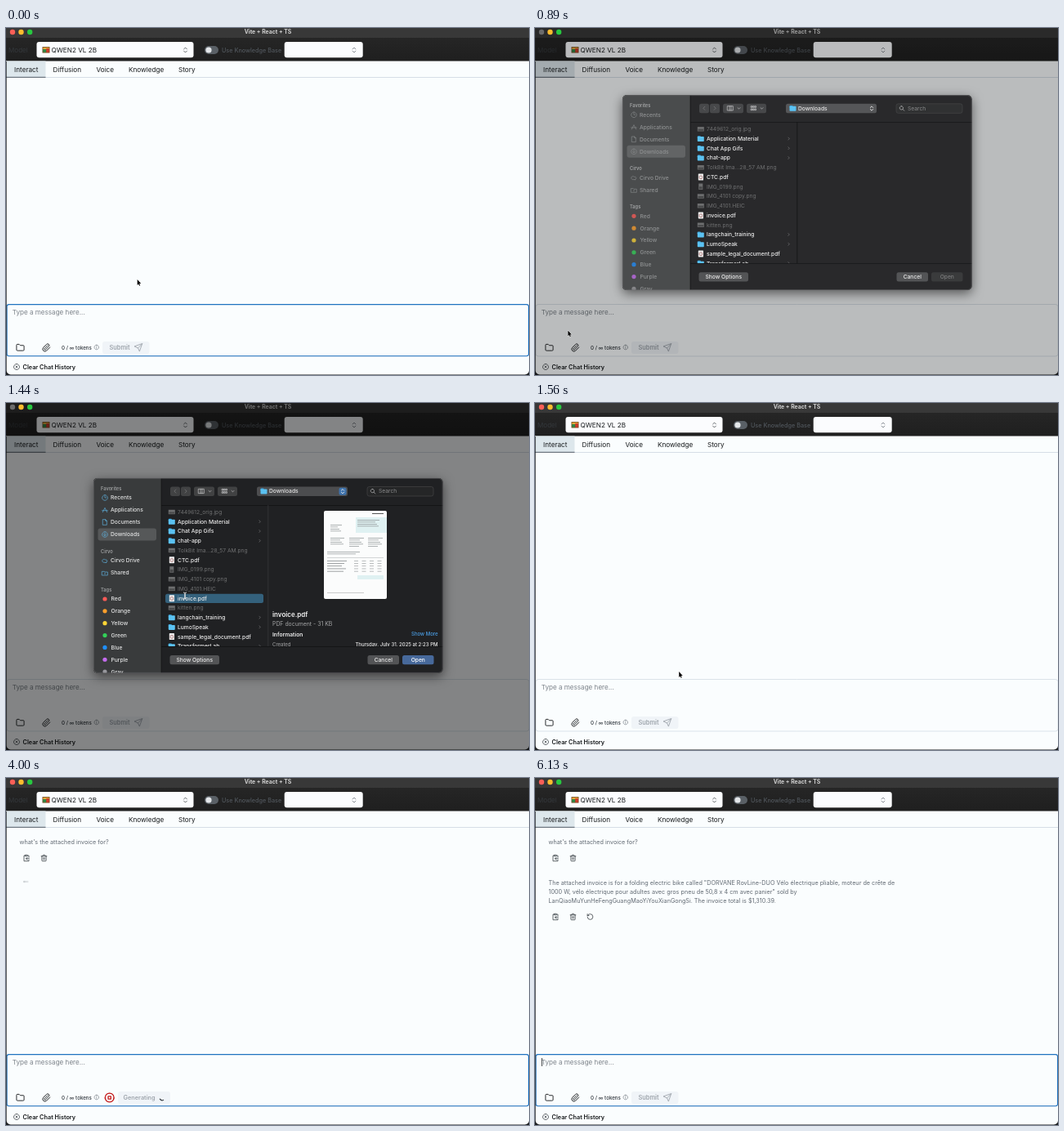
These frames come from a looping animation (640x425 px, 6270 ms). An HTML page with a canvas:

```html
<!DOCTYPE html>
<html lang="en">
<head>
<meta charset="utf-8">
<title>Chat demo</title>
<style>
html, body { margin: 0; width: 100%; height: 100%; overflow: hidden; background: #fafdfe; }
canvas { display: block; width: 640px; height: 425px; }
</style>
</head>
<body>
<canvas id="stage"></canvas>
<script>
const W = 640, H = 425, LOOP = 6270, STEP = 1000 / 9, LAST = 55;
const canvas = document.getElementById('stage');
const ctx = canvas.getContext('2d');
const dpr = window.devicePixelRatio || 1;
canvas.width = W * dpr;
canvas.height = H * dpr;

const FONT = 'Inter, Roboto, "Liberation Sans", sans-serif';
const INK = '#171a1c', SLATE = '#32383e', GREY = '#636b74';

const PROMPT = "what's the attached invoice for?";
const ANSWER = [
  'The attached invoice is for a folding electric bike called "DORVANE RovLine-DUO Vélo électrique pliable, moteur de crête de',
  '1000 W, vélo électrique pour adultes avec gros pneu de 50,8 x 4 cm avec panier" sold by',
  'LanQiaoMuYunHeFengGuangMaoYiYouXianGongSi. The invoice total is $1,310.39.'
];
const ANSWER_LENGTH = ANSWER.join('').length;

// Icons on a 24 unit grid
const ICONS = {
  folder: 'M20 20a2 2 0 0 0 2-2V8a2 2 0 0 0-2-2h-8l-3-3H4a2 2 0 0 0-2 2v13a2 2 0 0 0 2 2Z',
  clip: 'm21.4 11-9.2 9.2a6 6 0 0 1-8.5-8.5l8.6-8.5A4 4 0 1 1 18 8.8l-8.6 8.6a2 2 0 0 1-2.8-2.8l8.5-8.5',
  send: 'm22 2-7 20-4-9-9-4ZM22 2 11 13',
  trash: 'M3 6h18M19 6v14a2 2 0 0 1-2 2H7a2 2 0 0 1-2-2V6M8 6V4a2 2 0 0 1 2-2h4a2 2 0 0 1 2 2v2M10 11v6M14 11v6',
  paste: 'M9 2h6v4H9ZM8 4H4v18h16v-4M16 4h4v6M21 14H11M15 10l-4 4 4 4',
  redo: 'M3 12a9 9 0 1 0 9-9 9.8 9.8 0 0 0-6.7 2.7L3 8M3 3v5h5',
  cross: 'M18 6 6 18M6 6l12 12',
  unfold: 'M7 15l5 5 5-5M7 9l5-5 5 5',
  clear: 'M12 2a10 10 0 1 0 .01 0M15 9l-6 6M9 9l6 6',
  info: 'M12 2a10 10 0 1 0 .01 0M12 17v-6M12 7v.5',
  stop: 'M12 2a10 10 0 1 0 .01 0M9 9h6v6H9Z',
  clock: 'M12 2a10 10 0 1 0 .01 0M12 6v6h4',
  apps: 'M4 20 12 4l8 16M2 14h20',
  page: 'M5 2h9l5 5v15H5ZM14 2v5h5',
  down: 'M12 2a10 10 0 1 0 .01 0M12 7v9M8 13l4 4 4-4',
  cloud: 'M17 19H8a6 6 0 1 1 5-10 5 5 0 1 1 4 10Z',
  shared: 'M2 7h8l2 2h10v12H2ZM12 12v5',
  search: 'M10 3a7 7 0 1 0 .01 0M15 15l6 6',
  left: 'M15 5l-7 7 7 7',
  right: 'M9 5l7 7-7 7',
  chevron: 'M5 9l7 7 7-7',
  columns: 'M2 4h20v16H2ZM9 4v16M15 4v16',
  grid: 'M3 4h4v5H3ZM10 4h4v5h-4ZM17 4h4v5h-4ZM3 14h4v5H3ZM10 14h4v5h-4ZM17 14h4v5h-4Z'
};
for (const name in ICONS) ICONS[name] = new Path2D(ICONS[name]);

function text(str, x, y, size, color, weight = 400, align = 'left') {
  ctx.font = `${weight} ${size}px ${FONT}`;
  ctx.textAlign = align;
  ctx.fillStyle = color;
  ctx.fillText(str, x, y + size * 0.36);
}

function rect(x, y, w, h, fill) {
  ctx.fillStyle = fill;
  ctx.fillRect(x, y, w, h);
}

function box(x, y, w, h, r, fill, stroke, line = 0.6) {
  ctx.beginPath();
  ctx.roundRect(x, y, w, h, r);
  if (fill) { ctx.fillStyle = fill; ctx.fill(); }
  if (stroke) { ctx.strokeStyle = stroke; ctx.lineWidth = line; ctx.stroke(); }
}

function dot(x, y, r, fill) {
  ctx.beginPath();
  ctx.arc(x, y, r, 0, Math.PI * 2);
  ctx.fillStyle = fill;
  ctx.fill();
}

function icon(name, x, y, size, color, line = 2) {
  ctx.save();
  ctx.translate(x - size / 2, y - size / 2);
  ctx.scale(size / 24, size / 24);
  ctx.strokeStyle = color;
  ctx.lineWidth = line;
  ctx.lineCap = ctx.lineJoin = 'round';
  ctx.stroke(ICONS[name]);
  ctx.restore();
}

// Linear interpolation through [step, value] pairs
function along(keys, k) {
  if (k <= keys[0][0]) return keys[0][1];
  for (let i = 1; i < keys.length; i++) {
    const [a, from] = keys[i - 1], [b, to] = keys[i];
    if (k <= b) return from + (to - from) * (k - a) / (b - a);
  }
  return keys[keys.length - 1][1];
}

function drawToolbar() {
  rect(0, 0, W, 12, '#383838');
  const shade = ctx.createLinearGradient(0, 11, 0, 40);
  shade.addColorStop(0, '#262626');
  shade.addColorStop(1, '#1f1f1f');
  rect(0, 12, W, 29, shade);
  text('Vite + React + TS', 320.5, 4.5, 6.9, '#d2d2d2', 700, 'center');
  text('Model', 3, 27, 8.1, '#34383c');

  box(37.5, 17, 192, 19.3, 3, '#fbfcfe');
  box(44.5, 23, 9, 7.5, 0.5, '#7a4a22');
  rect(45.3, 23.8, 7.4, 2.4, '#e0a83a');
  rect(45.3, 26, 4, 3.7, '#2f8a45');
  rect(49.3, 25, 3.4, 4.7, '#cf3a2b');
  text('QWEN2 VL 2B', 55.5, 27, 8.2, INK);
  icon('unfold', 219.5, 27, 9, SLATE);

  box(243, 22, 17, 10, 5, '#5a6066');
  dot(248, 27, 3.6, '#e4e7ea');
  text('Use Knowledge Base', 264, 27, 7.24, '#50565c', 500);
  box(340.7, 17, 96, 19.3, 3, '#fbfcfe');
  icon('unfold', 426, 27, 9, GREY);
}

function drawTabs() {
  rect(0, 40.5, W, 20, '#fafdfe');
  rect(0, 40.5, 48.5, 20, '#dde7ec');
  rect(0, 60, W, 0.8, '#cdd7e1');
  rect(0, 59.8, 48.5, 1, '#555e68');
  const tabs = { Interact: 10, Diffusion: 57.5, Voice: 110.5, Knowledge: 150, Story: 211 };
  for (const name in tabs) text(name, tabs[name], 51, 8.2, INK);
}

function drawChat(k) {
  if (k < 33) return;
  text(PROMPT, 16.5, 78, 7.24, GREY);
  icon('paste', 25, 98, 9, SLATE);
  icon('trash', 46.5, 98, 9, SLATE);

  if (k < 43) {
    for (let i = 0; i < 3; i++) {
      const glow = 0.4 + 0.2 * Math.sin((k - 36) * 1.1 - i);
      dot(22.3 + i * 2, 127, 1.3, `rgba(140,148,156,${glow})`);
    }
    return;
  }
  let left = Math.round(along([[42, 0], [43, 70], [44, 190], [45, ANSWER_LENGTH]], k));
  ANSWER.forEach((line, i) => {
    if (left > 0) text(line.slice(0, left), 16.5, 128 + i * 11.2, 7.24, GREY);
    left -= line.length;
  });
  if (k >= 45) {
    icon('paste', 25, 170, 9, SLATE);
    icon('trash', 46.5, 170, 9, SLATE);
    icon('redo', 67.5, 170, 9, SLATE);
  }
}

function caretOn(k, typing) {
  if (typing) return true;
  if (k >= 45) return ![47, 50, 52, 54].includes(k);
  return k >= 33 && k % 4 > 1;
}

function drawComposer(k) {
  const typing = k >= 18 && k < 33;
  const busy = k >= 33 && k < 45;
  const focus = k < 5 || k >= 17;

  if (k >= 15 && k < 33) {
    rect(0, 310.5, W, 23, '#f3f4f5');
    icon('clip', 10, 322, 7, '#8d949b');
    text('invoice.pdf', 15, 322, 7.24, GREY);
    icon('cross', 66, 322, 9, SLATE);
  }

  box(1, 338.5, W - 1, 63.5, 3, '#fafdfe', '#cdd7e1', 0.7);
  if (focus) box(1.1, 338.6, W - 1.6, 63.1, 2.5, null, '#1f72c0', 1.1);

  const count = Math.floor(along([[18, 1], [24, 14], [27, 24], [30, 27], [32, 32]], k));
  const typed = typing ? PROMPT.slice(0, count) : '';
  if (typing) text(typed, 8, 348, 8.1, INK);
  else text('Type a message here...', 7.7, 348, 8.1, '#7d838a');
  if (caretOn(k, typing)) {
    ctx.font = `400 8.1px ${FONT}`;
    rect(8 + ctx.measureText(typed).width, 343, 0.8, 10, INK);
  }

  icon('folder', 17.5, 391.5, 11, INK);
  icon('clip', 49.5, 391.5, 11, INK);
  text('0 / ∞ tokens', 68, 391.5, 6.2, SLATE, 500);
  icon('info', 110.8, 391, 6.8, GREY);

  if (busy) {
    icon('stop', 126.7, 391.5, 13, '#c41c1c', 2.4);
    box(137, 384, 64, 15, 3, '#f0f4f8');
    text('Generating', 143.5, 391.5, 7.3, '#9fa6ad', 600);
    const turn = (k - 36) * 1.9 + 1;
    ctx.beginPath();
    ctx.arc(191.2, 391.3, 3.4, turn, turn + 1.7);
    ctx.strokeStyle = SLATE;
    ctx.lineWidth = 1.1;
    ctx.stroke();
  } else {
    const ink = typing ? '#ffffff' : '#9fa6ad';
    box(118, 384, 57.5, 15, 3, typing ? '#5f6771' : '#f0f4f8');
    text('Submit', 126.5, 391.5, 7.4, ink, 600);
    icon('send', 162, 391.5, 11, ink);
  }

  icon('clear', 13, 415, 8.5, SLATE);
  text('Clear Chat History', 20.5, 415, 7.3, INK, 600);
}

// Dark window border with rounded lower corners
function drawEdges() {
  ctx.beginPath();
  ctx.rect(0, 41, W, H - 41);
  ctx.roundRect(0.7, 41, W - 0.7, H - 41.6, [0, 0, 5, 5]);
  ctx.fillStyle = '#1c1e20';
  ctx.fill('evenodd');
}

function drawLights(disabled) {
  dot(8, 5, 3.2, disabled ? '#6b6b6b' : '#fb5f57');
  dot(18.5, 5, 3.2, '#fdbc2e');
  dot(29.2, 5, 3.2, '#28c840');
}

function folderIcon(x, y) {
  box(x - 4, y - 3.4, 4, 3, 0.8, '#3aa5de');
  box(x - 4, y - 2.5, 8, 6, 0.8, '#5bc2f2');
}

function thumb(kind, x, y) {
  if (kind === 'dir') return folderIcon(x, y);
  if (kind === 'pdf') {
    box(x - 3, y - 4, 6.2, 8, 0.6, '#f1f1f1');
    box(x - 1.6, y - 1.4, 3.4, 3.4, 0.5, null, '#9a5a5a', 0.7);
    return;
  }
  const w = kind === 'tall' ? 5 : 8, h = kind === 'tall' ? 7.5 : 5.4;
  rect(x - w / 2, y - h / 2, w, h, '#6d6e6f');
  rect(x - w / 2 + 0.7, y, w - 1.4, h / 2 - 0.7, '#48494a');
}

const FILES = [
  ['img', '7449612_orig.jpg'], ['dir', 'Application Material'], ['dir', 'Chat App Gifs'],
  ['dir', 'chat-app'], ['img', 'TolkBit Ima...28_57 AM.png'], ['pdf', 'CTC.pdf'],
  ['tall', 'IMG_0199.png'], ['img', 'IMG_4101 copy.png'], ['img', 'IMG_4101.HEIC'],
  ['pdf', 'invoice.pdf'], ['img', 'kitten.png'], ['dir', 'langchain_training'],
  ['dir', 'LumoSpeak'], ['pdf', 'sample_legal_document.pdf'], ['dir', 'TransformerLab']
];
const PLACES = [
  ['clock', 'Recents', 116], ['apps', 'Applications', 131], ['page', 'Documents', 146],
  ['down', 'Downloads', 161], ['cloud', 'Cirvo Drive', 193], ['shared', 'Shared', 208]
];
const TAGS = [
  ['Red', '#fc5b57'], ['Orange', '#fd9f2b'], ['Yellow', '#fcd535'], ['Green', '#32d158'],
  ['Blue', '#1f8fff'], ['Purple', '#c56cf0'], ['Gray', '#98989d']
];

function drawSidebar(active) {
  const ink = active ? '#e4e5e5' : '#8f9192';
  const head = active ? '#9b9d9e' : '#a0a2a3';
  rect(107, 92, 83, 239, active ? '#393b3c' : '#4a4c4d');
  box(112.5, 153.5, 71.5, 15, 3, active ? '#565859' : '#626465');
  text('Favorites', 116, 105, 5.7, head, 600);
  text('Cirvo', 116, 181.5, 5.7, head, 600);
  text('Tags', 116, 228.5, 5.7, head, 600);
  for (const [name, label, y] of PLACES) {
    icon(name, 121, y, 8, active ? '#5fb4e2' : '#85888a');
    text(label, 128, y, 6.7, ink, 500);
  }
  TAGS.forEach(([label, color], i) => {
    const y = 240 + i * 14.85;
    ctx.save();
    if (!active) ctx.globalAlpha *= 0.75;
    dot(121, y, 2.6, color);
    ctx.restore();
    text(label, 128.5, y, 6.7, ink, 500);
  });
}

function drawHeader(active) {
  const fill = active ? '#414243' : '#47484a', ink = '#d0d1d2';
  box(201, 102.5, 12, 11.5, 2.5, fill);
  box(214, 102.5, 12, 11.5, 2.5, fill);
  icon('left', 207, 108, 7, '#8a8b8c');
  icon('right', 220, 108, 7, '#8a8b8c');
  box(230, 102.5, 25, 11.5, 2.5, fill);
  icon('columns', 239, 108, 8, ink);
  icon('chevron', 249.5, 108, 5, ink, 3);
  box(259, 102.5, 24, 11.5, 2.5, fill);
  icon('grid', 267.5, 108, 8, ink);
  icon('chevron', 277.5, 108, 5, ink, 3);
  box(307, 102.5, 111, 11.5, 2.5, active ? '#4c4d4f' : '#555658');
  folderIcon(315.5, 108);
  text('Downloads', 322, 108, 6.7, '#e8e8e8', 500);
  if (active) box(407.5, 103.7, 9, 9, 2, '#3f73ad');
  icon('unfold', 412, 108.2, 8, '#f0f0f0', 2.6);
  box(442, 102.5, 81, 11.5, 2.5, active ? '#252627' : '#303132', '#4a4b4c');
  icon('search', 449, 108.2, 7.5, ink);
  text('Search', 456, 108, 6.7, '#8b8c8d');
}

function drawFiles(picked) {
  FILES.forEach(([kind, name], i) => {
    const y = 133.5 + i * 11.74;
    const open = kind === 'dir' || kind === 'pdf';
    if (picked && name === 'invoice.pdf') box(195, y - 5.5, 120, 11.4, 2.5, '#34617c');
    thumb(kind, 202.8, y);
    text(name, 210, y, 6.7, open ? '#eeeeee' : '#6f7071', open ? 500 : 400);
    if (kind === 'dir') icon('right', 310.5, y, 5, '#8a8b8c', 2.6);
  });
}

function drawPreview() {
  box(389, 132, 77, 108, 2, '#fbfcfc');
  rect(428, 140, 38, 19, '#dff1f2');
  rect(448, 135, 14, 1, '#555');
  const bars = [[397, 149, 14, 4], [397, 165, 17, 4], [420, 165, 18, 5], [443, 165, 18, 5], [430, 143, 27, 4], [393, 182, 40, 2]];
  for (const [x, y, w, rows] of bars)
    for (let i = 0; i < rows; i++) rect(x, y + i * 2.5, w - (i * 5) % 7, 0.7, '#8b9193');
  rect(393, 189, 69, 0.6, '#b9bdbe');
  for (let i = 0; i < 5; i++) {
    rect(393, 193 + i * 3.2, 24 - (i * 3) % 8, 0.7, '#777c7e');
    for (let c = 0; c < 4; c++) rect(426 + c * 9.5, 193 + i * 3.2, 5, 0.7, '#9da1a3');
  }
  rect(430, 211, 32, 5, '#dff1f2');
  rect(393, 232, 45, 0.6, '#aaa');

  text('invoice.pdf', 326, 259, 8, '#f2f2f2', 600);
  text('PDF document - 31 KB', 326, 270.5, 6.9, '#a4a5a6');
  text('Information', 326, 283.3, 6.7, '#f0f0f0', 600);
  text('Show More', 528.5, 283.3, 6, '#4ba0e8', 500, 'right');
  text('Created', 326, 296, 6, '#a4a5a6');
  text('Thursday, July 31, 2025 at 2:23 PM', 528.5, 296, 6, '#ececec', 500, 'right');
}

function button(label, x, w, fill, ink) {
  box(x, 309, w, 11.3, 2.5, fill);
  text(label, x + w / 2, 314.6, 6.7, ink, 500, 'center');
}

function drawDialog(active, picked, rise, alpha) {
  ctx.save();
  ctx.globalAlpha = alpha;
  ctx.translate(0, -rise);
  ctx.save();
  ctx.shadowColor = 'rgba(0,0,0,0.55)';
  ctx.shadowBlur = 14 * dpr;
  ctx.shadowOffsetY = 4 * dpr;
  box(107, 92, 427.5, 238.7, 5, '#29292b');
  ctx.restore();

  ctx.save();
  ctx.beginPath();
  ctx.roundRect(107, 92, 427.5, 238.7, 5);
  ctx.clip();
  rect(107, 92, 428, 239, active ? '#202123' : '#29292b');
  drawSidebar(active);
  rect(189.7, 92, 0.8, 239, '#141516');
  drawHeader(active);

  ctx.save();
  ctx.beginPath();
  ctx.rect(190, 125, 345, 173);
  ctx.clip();
  drawFiles(picked);
  if (picked) drawPreview();
  ctx.restore();

  const rule = active ? '#0f1011' : '#151617';
  rect(190, 125, 345, 0.7, rule);
  rect(320.5, 125, 0.7, 173, active ? '#3a3b3c' : '#111213');
  rect(190, 298, 345, 0.7, rule);
  button('Show Options', 200.5, 60.5, '#535456', '#eeeeee');
  button('Cancel', 442.5, 38.5, '#535456', '#eeeeee');
  if (picked) button('Open', 485, 38.5, '#47699b', '#ffffff');
  else button('Open', 485, 38.5, '#3a3b3c', '#7c7d7e');
  ctx.restore();
  box(107.3, 92.3, 426.9, 238.1, 5, null, '#6a6b6c', 0.6);
  ctx.restore();
}

function drawArrow(x, y) {
  ctx.save();
  ctx.translate(x, y);
  ctx.scale(0.45, 0.49);
  const shape = new Path2D('M0 0V14.2L3.3 11.2 5.4 16 7.7 15 5.6 10.2H10Z');
  ctx.strokeStyle = '#fff';
  ctx.lineWidth = 1.8;
  ctx.stroke(shape);
  ctx.fillStyle = '#000';
  ctx.fill(shape);
  ctx.restore();
}

function drawBeam(x, y, color) {
  ctx.strokeStyle = color;
  ctx.lineWidth = 0.9;
  ctx.stroke(new Path2D(`M${x - 2} ${y - 4}q2 0 2 1.5v5q0 1.5 -2 1.5M${x + 2} ${y - 4}q-2 0 -2 1.5v5q0 1.5 2 1.5`));
}

const POINTER_X = [[0, 160.7], [5, 48], [7, 48], [8, 40.4], [12, 219], [13, 219], [14, 176.2], [17, 110]];
const POINTER_Y = [[0, 308], [5, 390], [7, 390], [8, 370.4], [12, 236], [13, 236], [14, 329], [17, 358]];

function drawPointer(k) {
  if (k >= 18) return;
  const x = along(POINTER_X, k), y = along(POINTER_Y, k);
  if (k === 12 || k === 13) drawBeam(x, y, '#e8e8e8');
  else if (k >= 16) drawBeam(x, y, INK);
  else drawArrow(x, y);
}

function draw(k) {
  ctx.setTransform(dpr, 0, 0, dpr, 0, 0);
  rect(0, 0, W, H, '#fafdfe');
  drawToolbar();
  drawTabs();
  drawChat(k);
  drawComposer(k);
  drawEdges();

  const sheet = k >= 7 && k < 14;
  if (sheet) rect(0, 0, W, H, `rgba(0,0,0,${along([[7, 0.12], [8, 0.26], [9, 0.48]], k)})`);
  drawLights(k >= 6 && k < 14);
  if (sheet) drawDialog(k > 8, k >= 12, along([[7, 20], [8, 9.7], [9, 0]], k), k === 7 ? 0.6 : 1);
  drawPointer(k);
}

function tick() {
  const t = performance.now() % LOOP;
  draw(Math.min(LAST, Math.floor((t + 0.5) / STEP)));
  requestAnimationFrame(tick);
}
tick();
</script>
</body>
</html>
```
